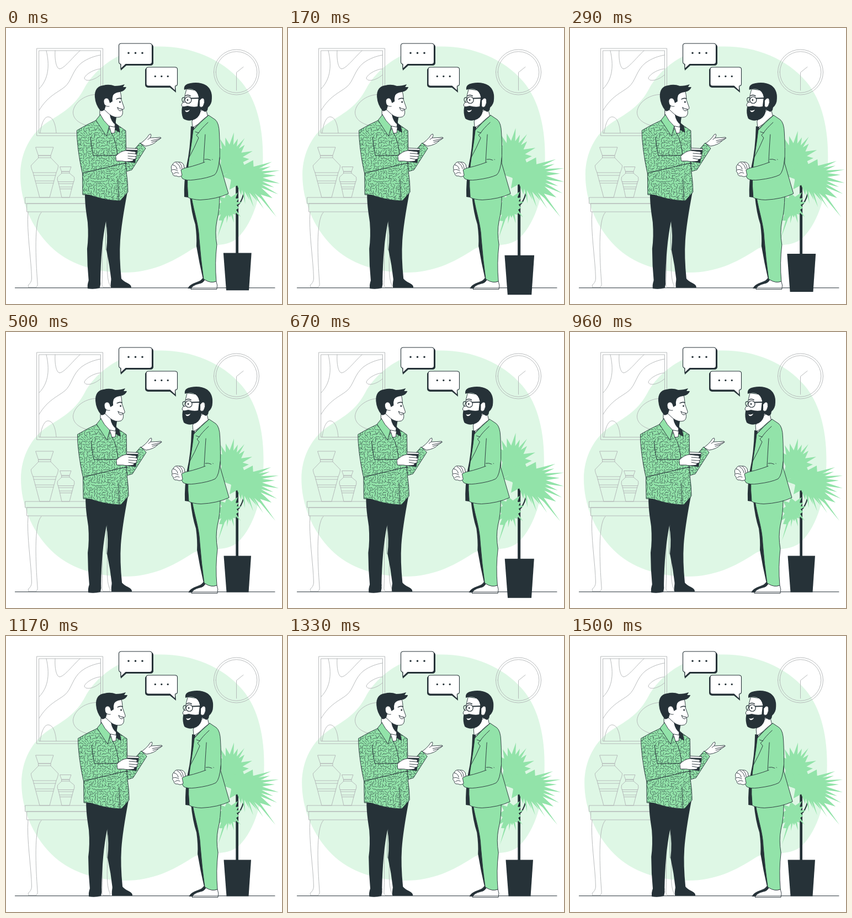
These frames come from a looping animation (500x500 px, 1540 ms). An HTML page with a canvas:

```html
<!DOCTYPE html>
<html lang="en">
<head>
<meta charset="utf-8">
<title>Two men talking</title>
<style>
html, body { margin: 0; width: 100%; height: 100%; overflow: hidden; background: #fff; }
canvas { display: block; width: 100vw; height: 100vh; }
</style>
</head>
<body>
<canvas id="stage" width="500" height="500"></canvas>
<script>
const ctx = document.getElementById('stage').getContext('2d');
const LOOP = 1540;
const DARK = '#263238', GREEN = '#92e3a9', PALE = '#def7e5', GREY = '#b0b4b5', WHITE = '#fff';

// A part is a path with an optional fill and outline.
const part = (d, fill, line, width = 1) => ({ path: new Path2D(d), fill, line, width });
const solid = (d, fill) => part(d, fill);
const inked = (d, fill, width = 0.9) => part(d, fill, DARK, width);
const stroke = (d, width = 0.9) => part(d, null, DARK, width);
const thin = d => part(d, null, GREY, 0.9);
const dot = (x, y, r) => `M${x - r} ${y}a${r} ${r} 0 1 0 ${2 * r} 0a${r} ${r} 0 1 0 ${-2 * r} 0Z`;

function draw(parts) {
  for (const { path, fill, line, width } of parts) {
    if (fill) { ctx.fillStyle = fill; ctx.fill(path); }
    if (line) { ctx.strokeStyle = line; ctx.lineWidth = width; ctx.stroke(path); }
  }
}

const blob = [solid(`M26 266C26 226 45 190 76 170C104 153 126 140 142 109C162 73 211 33 276 33.5
  C335 33 390 55 426 97C456 132 466 185 465.5 235C465 296 450 350 420 380C396 402 360 386 335 402
  C300 425 262 443 215 443C160 443 112 427 80 395C45 360 26 312 26 266Z`, PALE)];

const room = [
  thin('M56 37H175.500V195H56ZM60 41H171.500V190.500H60Z'),
  thin('M89 41C88 58 91 73 97 74C106 73 119 55 134 41'),
  thin('M73 41C79 66 78 92 60 110'),
  thin('M60 149C76 123 92 118 106 107C119 97 120 76 137 63C148 55 160 51 171 49'),
  thin('M171 74C158 75 143 85 142 91C144 98 160 95 171 85'),
  thin('M171 121C146 117 122 135 121.500 153C122 168 138 178 171 181'),
  thin('M62 190C64 172 70 160 77 161C86 162 90 176 91 190'),
  thin(dot(417.5, 80, 41) + dot(417.5, 80, 37.3)),
  thin('M417.500 113V80.500L430 70.500'),
  thin('M54 216H86L81 231H59ZM59 231H81V235H59ZM59 235L45.500 249Q45 253 49 262L61 307H79L91 262Q95 253 94.500 249L81 235'),
  thin('M49 262H91M50 267H90M53 277H87M55 281H86'),
  thin('M98 251.500H118L115 260H101ZM101 260H115V263H101ZM101 263L93.500 270Q92 275 95 280L101 307H115L122 280Q125 275 123.500 270L115 263'),
  thin('M94 278.500H123M95 282H122M97 288H120M98 291.500H119'),
  thin('M35 307H193V318H35ZM38 318H190V333H38Z'),
  thin('M40 333C37 368 46 420 46.500 454Q46 461 41 465Q39 468 41 470H54Q58 468 57 461C54 420 50 348 64 334'),
  thin('M176 334C172 370 176 425 174 461Q173 468 177 470H187Q190 468 187 463C178 440 188 370 188 333')
];

const ground = [stroke('M16.500 470.700H487', 1.1)];

const bubbles = [
  solid('M210 29H262Q267 30 267 34V64Q266 68 262 68H218L208 77L207 65Z', DARK),
  inked('M209 28H260Q264.500 28 264.500 32V61Q264.500 65.500 260 65.500H217L208 74V65.500Q204.500 65 204.500 61V32Q204.500 28 209 28Z', WHITE, 1.1),
  solid([222, 234.5, 247].map(x => dot(x, 45.3, 1.8)).join(''), DARK),
  solid('M257 72L307 74V106L308 117L297 108H257Q252 107 252 103V76Q252 73 257 72Z', DARK),
  inked('M258 71H306Q310.500 71 310.500 75V101Q310.500 105 306.500 105V114L297 105H258Q254 105 254 101V75Q254 71 258 71Z', WHITE, 1.1),
  solid([270.3, 281.8, 293.2].map(x => dot(x, 87.6, 1.7)).join(''), DARK)
];

// Spiky leaf: tips listed clockwise, with valleys pulled towards the centre.
function fan(cx, cy, depth, tips) {
  const points = tips.flatMap(([x, y], i) => {
    const [nx, ny] = tips[(i + 1) % tips.length];
    return [[x, y], [cx + ((x + nx) / 2 - cx) * depth, cy + ((y + ny) / 2 - cy) * depth]];
  });
  return solid('M' + points.map(p => p.join(' ')).join('L') + 'Z', GREEN);
}

const plant = [
  solid('M416.300 262H421V407H416.300Z', DARK),
  part('M419 322Q426 317 430 302', null, DARK, 2),
  fan(405, 242, 0.62, [[378, 215], [389, 205], [398, 202], [413, 193], [420, 204], [432, 203],
    [432, 215], [446, 226], [440, 240], [433, 262], [412, 285], [385, 272]]),
  fan(424, 268, 0.6, [[402, 245], [425, 235], [447, 242], [480, 245], [478, 253], [494, 260],
    [487, 269], [494, 283], [484, 290], [491, 302], [481, 309], [488, 342], [468, 316],
    [466, 328], [455, 315], [448, 325], [441, 313], [433, 319], [426, 304], [405, 294], [390, 270]]),
  fan(405, 321, 0.65, [[385, 305], [400, 300], [420, 299], [422, 309], [427, 316], [422, 326],
    [425, 342], [416, 338], [413, 352], [406, 343], [400, 353], [396, 345], [384, 378], [386, 348], [378, 344], [382, 322]]),
  solid('M394.500 405.500H444L439.500 471.500H399.500Z', DARK)
];

const shirt = inked(`M166 166Q146 175 128.500 185.500C128 205 133 240 138.500 263L139 302Q150 301 159 305
  Q185 313 207 313L221 297Q221 280 218 260L228 257L253 218L243 208L218 237L217 186L204 177L190 182Z`, GREEN);

function shirtDashes() {
  let seed = 7, d = '';
  const random = () => (seed = seed * 16807 % 2147483647) / 2147483647;
  for (let y = 166; y < 314; y += 4.6) {
    for (let x = 126; x < 256; x += 4.6) {
      const angle = random() * Math.PI, dx = Math.cos(angle) * 2.2, dy = Math.sin(angle) * 2.2;
      const px = x + random() * 2.4, py = y + random() * 2.4;
      d += `M${px - dx} ${py - dy}L${px + dx} ${py + dy}`;
    }
  }
  return part(d, null, DARK, 0.65);
}
const dashes = shirtDashes();

const leftLegs = [
  solid(`M143 299C143 325 147 342 148 352Q150 378 147 400Q147 430 150 460H171Q172 395 181 351
    Q185 375 182 402Q188 430 191 458L209 454Q205 415 207 385Q209 355 220 297Z`, DARK),
  solid('M150 457Q147 465 148 472Q159 474 170 471Q172 464 171 457Z', DARK),
  solid('M191 454Q189 464 190 470.500H227Q228 466 220 462Q213 459 208 453Z', DARK),
  part('M182 350Q180 372 181 402', null, '#4d595e', 0.6)
];

const leftTop = [
  inked('M170 149L170 158Q182 177 194 191L199 176L197 160L190 148Z', WHITE),
  solid('M188 157L200 162L198 175Q190 169 188 157Z', DARK),
  inked('M171 157L163 167L182 196L187 178Q176 168 171 157Z', GREEN),
  inked('M198 172L204 177L206 189L197 184Z', DARK),
  inked('M187 178L191 191L197 190L198 180Z', WHITE),
  stroke('M191 190Q200 205 202 230M203 275L204 313'),
  stroke('M153 198Q155 216 158 231L200 230.500M138.500 263L201 248Q210 246 219 245M219 258Q216 251 217 239', 1.1),
  inked('M219 221H238L233.500 244L218 242Z', DARK),
  inked('M217.500 217.500L239 218.500L238.500 221.500L217.500 221Z', WHITE),
  inked('M199 232Q207 223 217 222L234 224Q237 226 234 228L237 229Q238 232 235 233L236 235Q235 238 231 238L230 241Q218 243 211 241L200 241Z', WHITE),
  stroke('M221 227L234 228M221 232L235 233M221 236L231 238'),
  inked('M244 209Q252 203 256 198Q259 192 262 192Q264 194 261 199Q269 199 280 198Q282 200 274 204Q267 212 253 214Z', WHITE),
  stroke('M263 204Q271 203 281 199.500M264 207L274 204M261 199L257 202')
];

const leftHead = [
  inked('M180 120Q194 112 207 114Q209 122 209 130L214 144Q215 147 211 148Q213 158 207 161Q197 164 187 156L174 144Z', WHITE),
  solid(`M171 150Q162 139 161 125Q160 106 176 104Q187 101 197 105Q207 105 215 102L212 107L218 107
    Q216 114 206 116Q197 117 194 122Q192 127 193 133L188 136L183 134L179 147Q175 152 171 150Z`, DARK),
  inked('M187 142Q181 143 178 138Q175 129 181 127Q186 126 188 134', WHITE),
  solid(dot(206.5, 134, 1.5), DARK),
  stroke('M200 129Q205 126 209 128', 1.4),
  inked('M202 144Q206 147 211 147Q209 151 206 150Q203 149 202 144Z', WHITE, 1)
];

const rightLegs = [
  solid('M333 305Q336 335 343 356Q346 378 345 395Q350 425 357 455H366L350 306Z', DARK),
  inked('M336 306C341 336 349 355 350 382Q353 420 358 455Q370 464 381 459Q378 425 382 393Q378 370 382 350Q387 330 387 304Z', GREEN),
  inked('M330 471Q333 465 345 461Q353 459 357 453L362 460L357 472Z', DARK),
  inked('M335 473Q337 466 350 463Q357 462 360 456Q371 463 381 459Q384 466 382 473Z', WHITE),
  stroke('M335 471H382')
];

const rightTop = [
  inked('M348 151L337 169L338 181L366 162L362 145Z', WHITE),
  solid('M335 178L341 179Q339 205 332 235L330 307L323 306Q322 280 327 250Q334 220 335 178Z', DARK),
  inked(`M339 185Q350 170 367 158L379 166Q386 172 386.500 190Q388 215 387 245L403 300
    Q382 310 352 311.500Q338 311 330 307Q326 266 333 228Q337 204 339 185Z`, GREEN),
  stroke('M367 158Q352 171 339 185M366 171Q353 183 349 190L345 194L349 199Q341 218 332 234M349 190L343 188'),
  stroke('M361 193Q359 222 358 243M376 246Q372 236 360 238M373 248Q377 242 374 238'),
  inked('M360 243Q336 252 317 255Q313 264 320 273Q327 277 341 275Q366 272 378 266Q385 260 387 235', GREEN),
  inked(`M302 247Q305 241 312 243Q319 242 322 248L323 254L317 257L319 267Q314 271 309 268
    Q302 269 302 263Q298 260 300 256Q298 250 302 247Z`, WHITE),
  stroke('M302 248Q309 249 310 256M308 244Q315 248 316 255M301 257Q306 255 311 259M304 264Q308 260 313 263M313 243Q319 248 319 255')
];

const rightHead = [
  inked('M327 111Q324 121 323 130L318 139Q317 142 322 143L330 157L349 154L361 144L358 115Z', WHITE),
  solid(`M323 112Q321 102 334 100Q351 97 363 104Q374 112 373 128Q373 138 366 144L365 149L361 152L353 148
    Q352 160 343 165Q331 171 321 164Q317 155 319 143L329 141Q340 144 347 142L349 125Q347 114 338 111Q329 109 323 112Z`, DARK),
  inked('M351 142Q353 145 357 142Q361 135 359 129Q356 124 351 131', WHITE),
  inked(dot(330, 130.5, 6), WHITE, 1.2),
  stroke('M324 126Q318 125 319 131Q320 136 324 134', 1.1),
  stroke('M336 127.500L352 127', 1.8),
  stroke('M325 123Q329 120 334 123', 1.5),
  solid(dot(329, 130.5, 1.4), DARK),
  solid('M324 149Q328 151 333 148Q331 153 326 152Z', WHITE)
];

function lerpKeys(keys, x) {
  const i = Math.max(1, keys.findIndex(k => k[0] >= x));
  const [x0, y0] = keys[i - 1], [x1, y1] = keys[i];
  return y0 + (y1 - y0) * (x - x0) / (x1 - x0);
}

const PHASE = [[0, 0.027], [290, 0.205], [500, 0.36], [1170, 0.803], [1500, 1], [LOOP, 1]];
const SHAKE = [[0, 0], [0.1, -1], [0.2, 2], [0.3, -4], [0.4, 4], [0.5, -4],
  [0.6, 4], [0.7, -4], [0.8, 2], [0.9, -1], [1, 0]];
const BEAT = [[0, 1], [0.1, 1.1], [0.3, 1], [0.4, 1], [0.5, 1.1], [0.6, 1], [1, 1]];

function shifted(dx, paint) {
  ctx.save();
  ctx.translate(dx, 0);
  paint();
  ctx.restore();
}

function drawMen() {
  draw(leftLegs);
  draw([shirt]);
  ctx.save();
  ctx.clip(shirt.path);
  draw([dashes]);
  ctx.restore();
  [leftTop, leftHead, rightLegs, rightTop, rightHead].forEach(draw);
}

function render(time) {
  const phase = lerpKeys(PHASE, time % LOOP);
  const dx = lerpKeys(SHAKE, phase) + 0.2;
  const scale = lerpKeys(BEAT, phase);
  ctx.fillStyle = WHITE;
  ctx.fillRect(0, 0, 500, 500);
  ctx.lineJoin = ctx.lineCap = 'round';
  shifted(dx, () => draw(blob));
  draw(room);
  draw(ground);
  ctx.save();
  ctx.translate(419, 332);
  ctx.scale(scale, scale);
  ctx.translate(-419, -332);
  draw(plant);
  ctx.restore();
  shifted(dx, drawMen);
  draw(bubbles);
}

const start = performance.now();
function tick() {
  render(performance.now() - start);
  requestAnimationFrame(tick);
}
tick();
</script>
</body>
</html>
```
